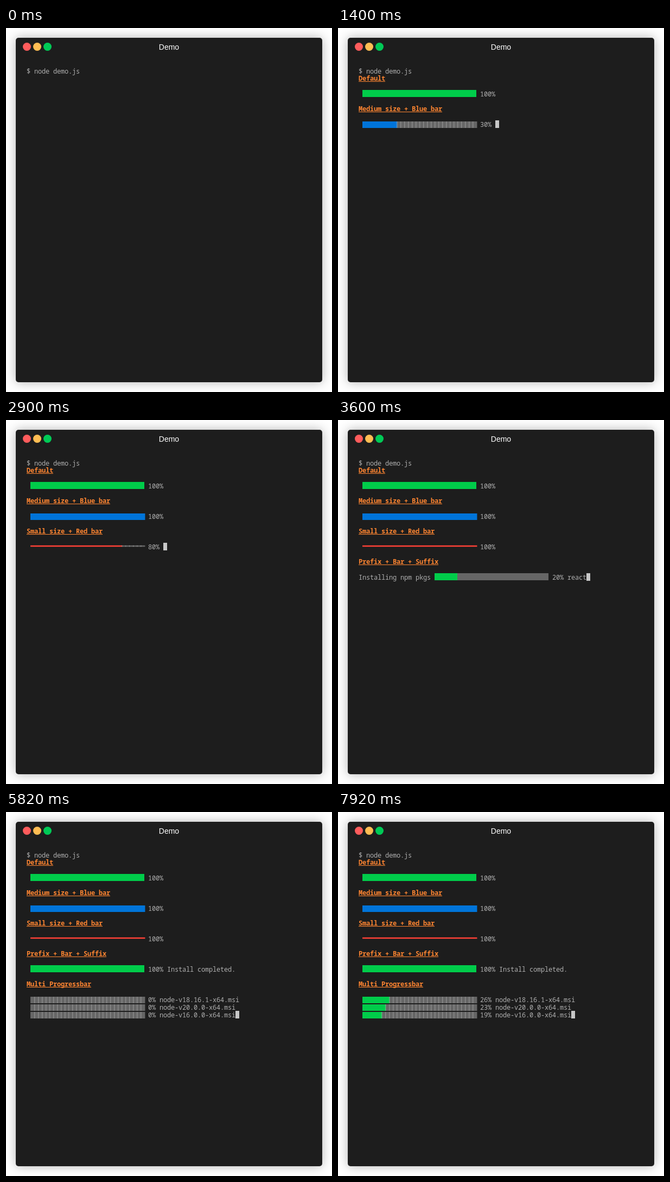
An HTML page for the animation above (8000 ms loop, 601 px wide and 670 px high).

```html
<!DOCTYPE html>
<html lang="en">
<head>
<meta charset="utf-8">
<title>Demo</title>
<style>
  html, body { margin: 0; width: 100%; height: 100%; overflow: hidden; background: #fff; }
  #window {
    position: absolute; left: 18px; top: 18px; width: 565px; height: 634px;
    border-radius: 5px; background: #1d1d1d; box-shadow: 0 0 20px rgba(0, 0, 0, .3);
  }
  svg { position: absolute; left: 0; top: 0; display: block; }
  #screen text { font: 12px "Noto Sans Mono", "DejaVu Sans Mono", monospace; fill: #afafaf; white-space: pre; }
  #screen .head { font-weight: bold; fill: #ff8531; }
  #title { font: 14px "Liberation Sans", Arial, sans-serif; fill: #fff; }
</style>
</head>
<body>
<div id="window"></div>
<svg width="601" height="670" viewBox="0 0 601 670">
  <circle cx="38.5" cy="34.5" r="7.5" fill="#ff5c5c"/>
  <circle cx="57.5" cy="34.5" r="7.5" fill="#ffbd53"/>
  <circle cx="76.5" cy="34.5" r="7.5" fill="#00ca56"/>
  <text id="title" x="300.5" y="40" text-anchor="middle">Demo</text>
  <g id="screen"></g>
</svg>
<script>
const LOOP = 8000, CELL_W = 7, CELL_H = 14, CELLS = 30;
const GREEN = '#00cc4a', BLUE = '#0074d9', RED = '#ff4136', GRAY = '#afafaf';

// Bar glyphs: top offset, height and width inside a cell
const LARGE = { dy: 0, h: 13, w: 7 };
const MEDIUM = { dy: 2, h: 12, w: 8.43 };
const SMALL = { dy: 4.8, h: 2.5, w: 8.43 };

const INSTALLS = [
  [3100, 0, ''], [3600, 20, 'react'], [4100, 40, 'vite'],
  [4600, 60, 'webpack'], [5100, 80, 'eslint'],
];
const FILES = ['node-v18.16.1-x64.msi', 'node-v20.0.0-x64.msi', 'node-v16.0.0-x64.msi'];
const DOWNLOADS = [
  [5820, 0, 0, 0], [5920, 5, 5, 5], [6020, 11, 10, 10], [6420, 12, 11, 11],
  [6620, 14, 13, 11], [6720, 15, 14, 12], [6920, 17, 15, 13], [7020, 18, 16, 14],
  [7220, 20, 18, 15], [7320, 21, 19, 16], [7420, 22, 20, 17], [7520, 23, 21, 18],
  [7720, 25, 22, 18], [7920, 26, 23, 19],
];

const screen = document.getElementById('screen');
const colX = col => 38 + col * CELL_W;
const rowY = row => 72 + row * CELL_H;
const latest = (steps, t) => steps.filter(s => s[0] <= t).pop();
const sweep = (t, start) => Math.min(100, Math.floor((t - start) / 100) * 10);

const rect = (x, y, w, h, fill, alpha = 1) =>
  `<rect x="${x}" y="${y}" width="${w}" height="${h}" fill="${fill}" fill-opacity="${alpha}"/>`;

function text(row, col, str, cls = '', baseline = 12) {
  const xs = [...str].map((_, i) => colX(col + i)).join(' ');
  return `<text class="${cls}" x="${xs}" y="${rowY(row) + baseline}">${str}</text>`;
}

function heading(row, str) {
  return text(row, 0, str, 'head', 11) +
    rect(colX(0), rowY(row) + 12, str.length * CELL_W, 1, '#ff8531');
}

function bar(row, col, pct, color, glyph) {
  const done = Math.floor(pct * CELLS / 100);
  const y = rowY(row) + glyph.dy;
  let out = done ? rect(colX(col), y, (done - 1) * CELL_W + glyph.w, glyph.h, color) : '';
  if (glyph.w === CELL_W) {
    return done < CELLS
      ? out + rect(colX(col + done), y, (CELLS - done) * CELL_W, glyph.h, GRAY, .5)
      : out;
  }
  // Wide glyphs overlap, which brightens each seam of the dimmed part
  for (let i = done; i < CELLS; i++) out += rect(colX(col + i), y, glyph.w, glyph.h, GRAY, .5);
  return out;
}

function frame(t) {
  let out = text(0, 0, '$ node demo.js');
  let cursor = null;

  const progress = (row, pct, color, glyph, suffix = '', prefix = '') => {
    const col = prefix.length + 1;
    const label = `${pct}% ${suffix}`;
    if (prefix) out += text(row, 0, prefix);
    out += bar(row, col, pct, color, glyph) + text(row, col + CELLS + 1, label);
    cursor = [row, col + CELLS + 1 + label.length];
  };

  if (t >= 100) {
    out += heading(1, 'Default');
    progress(3, sweep(t, 100), GREEN, LARGE);
  }
  if (t >= 1100) {
    out += heading(5, 'Medium size + Blue bar');
    progress(7, sweep(t, 1100), BLUE, MEDIUM);
  }
  if (t >= 2100) {
    out += heading(9, 'Small size + Red bar');
    progress(11, sweep(t, 2100), RED, SMALL);
  }
  if (t >= 3100) {
    out += heading(13, 'Prefix + Bar + Suffix');
    if (t < 5600) {
      const [, pct, name] = latest(INSTALLS, t);
      progress(15, pct, GREEN, LARGE, name, 'Installing npm pkgs');
    } else {
      progress(15, 100, GREEN, LARGE, 'Install completed.');
    }
  }
  if (t >= 5600) {
    out += heading(17, 'Multi Progressbar');
    cursor = [19, 0];
  }
  if (t >= 5820) {
    const [, ...pcts] = latest(DOWNLOADS, t);
    FILES.forEach((file, i) => progress(19 + i, pcts[i], GREEN, MEDIUM, file));
  }

  if (cursor) out += rect(colX(cursor[1]), rowY(cursor[0]), CELL_W, CELL_H, '#c7c7c7');
  return out;
}

const start = performance.now();
let shown = -1;

function tick(now) {
  // Every change falls on a 20 ms boundary
  const t = Math.floor(Math.max(0, now - start) % LOOP / 20) * 20;
  if (t !== shown) {
    shown = t;
    screen.innerHTML = frame(t);
  }
  requestAnimationFrame(tick);
}
tick(start);
</script>
</body>
</html>
```
